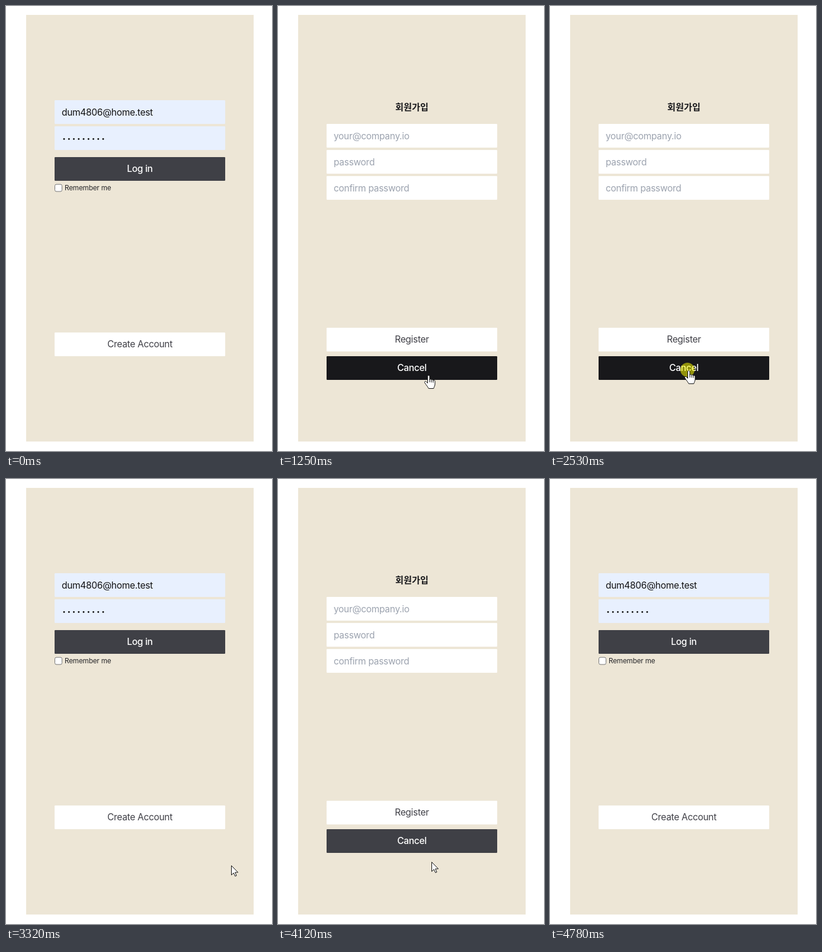
Recreate the animation shown at these times as an HTML page. Size 449x751 px, loop 5310 ms.

```html
<!DOCTYPE html>
<html lang="ko">
<head>
<meta charset="utf-8">
<title>Login and sign-up</title>
<style>
  html, body { margin: 0; width: 100%; height: 100%; overflow: hidden; background: #fff; }
  svg { display: block; width: 100vw; height: 100vh; }
  text { font: 400 15.5px Inter, "Noto Sans CJK KR", sans-serif; letter-spacing: -.3px; }
  .button text { text-anchor: middle; }
  .light rect { fill: #fff; }
  .light text { fill: #3f3f46; }
  .light.hover rect { fill: #cbd5e1; }
  .dark rect { fill: #3f4046; }
  .dark text { fill: #fff; font-weight: 500; }
  .dark.hover rect { fill: #18181b; }
  .field rect { fill: #fff; }
  .field text { fill: #9ca3af; }
  .filled rect { fill: #e8f0fe; }
  .filled text { fill: #111; }
  .title { font: 700 15.2px "Noto Sans CJK KR", "Noto Sans CJK", sans-serif; letter-spacing: 0; text-anchor: middle; fill: #18181b; }
  .small { font-size: 11.7px; letter-spacing: -.15px; fill: #27272a; }
  #pointer path { fill: #fff; stroke: #111; stroke-linejoin: round; }
</style>
</head>
<body>
<svg viewBox="0 0 449 751">
  <rect x="34" y="15" width="384" height="720" fill="#ede6d6"/>
  <g id="login">
    <g id="blank"></g>
    <g id="autofill"></g>
    <rect x="82.5" y="301" width="12" height="12" rx="2.5" fill="#fff" stroke="#767676"/>
    <text class="small" x="99" y="311">Remember me</text>
  </g>
  <g id="register">
    <text class="title" x="226" y="175.5">회원가입</text>
  </g>
  <circle id="click" r="12" fill="#ff0" fill-opacity=".53"/>
  <g id="pointer">
    <path id="arrow" d="M.5 .5V16.3L4.2 12.9L6.8 18.4L9.1 17.3L6.6 11.9H11.6Z"/>
    <g id="hand">
      <path d="M-1.5 2C-1.5 0 2 0 2 2V8C2 6.3 5 6.4 5 8.3C5 7 8 7.2 8 9.2C8 8 11 8.2 11 10.3V15C11 18 9.5 19.5 8.7 22.5H.2C-.8 20-3.7 17-6.4 12.6C-7.3 10.6-4.8 9.6-3.4 11.3L-1.5 13.4Z"/>
      <path d="M2 7.5V12M5 8.3V12.3M8 9.2V12.6"/>
    </g>
  </g>
</svg>
<script>
const LOOP = 5310, START = 190, TICK = 1000 / 15, EXIT = 69;
const byId = id => document.getElementById(id);

function make(parent, tag, attrs, text) {
  const node = document.createElementNS("http://www.w3.org/2000/svg", tag);
  for (const name in attrs) node.setAttribute(name, attrs[name]);
  if (text) node.textContent = text;
  return parent.appendChild(node);
}

function box(page, style, top, label, labelX, baseline) {
  const group = make(byId(page), "g", { class: style });
  make(group, "rect", { x: 82, y: top, width: 288, height: 40, rx: 1.2 });
  if (label) make(group, "text", { x: labelX, y: top + baseline }, label);
  return { group, top, page };
}
const field = (page, top, label, style = "") => box(page, "field " + style, top, label, 94, 26);
const button = (page, top, label, style) => box(page, "button " + style, top, label, 226, 25);

field("blank", 159, "your@company.io");
field("blank", 203, "password");
field("autofill", 159, "dum4806@home.test", "filled");
const secret = field("autofill", 203, "", "filled").group;
for (let i = 0; i < 9; i++) make(secret, "circle", { cx: 98 + 8.25 * i, cy: 224.5, r: 1.45, fill: "#111" });

["your@company.io", "password", "confirm password"]
  .forEach((label, row) => field("register", 199 + 44 * row, label));

const buttons = [
  button("login", 255, "Log in", "dark"),
  button("login", 551, "Create Account", "light"),
  button("register", 543, "Register", "light"),
  button("register", 591, "Cancel", "dark")
];

const linear = t => t;
const easeOut = t => 1 - (1 - t) ** 3;
const mix = (a, b, t) => a.map((v, i) => v + (b[i] - v) * t);

// Pointer moves, timed in ticks; "via" bends a move into a quadratic curve.
const enter = [416, 717];
const moves = [
  { start: 0, end: 7, via: [348, 566], to: [279, 566] },
  { start: 14, end: 22, to: [236, 664], ease: easeOut },
  { start: 23, end: 25, to: [229, 628] },
  { start: 27, end: 30, to: [234, 615] },
  { start: 36, end: 43, via: [240, 680], to: [350, 713] },
  { start: 43, end: 47, via: [509, 689], to: [380, 652] },
  { start: 47, end: 51, to: [295, 574] },
  { start: 53, end: 61, via: [262, 690], to: [253, 625] },
  { start: 62, end: 68, via: [300, 660], to: [437, 728] }
];
// Each click switches the page one tick later.
const clicks = [11, 35, 52, 61];

function pointerAt(tick) {
  let point = enter;
  for (const { start, end, via, to, ease = linear } of moves) {
    if (tick <= start) break;
    const t = ease(Math.min(1, (tick - start) / (end - start)));
    point = via ? mix(mix(point, via, t), mix(via, to, t), t) : mix(point, to, t);
  }
  return point.map(Math.round);
}

const show = (id, on) => { byId(id).style.display = on ? "" : "none"; };
const place = (id, x, y) => byId(id).setAttribute("transform", `translate(${x} ${y})`);

function draw(time) {
  const tick = Math.floor((time % LOOP - START) / TICK + .2);
  const page = clicks.filter(click => click < tick).length % 2 ? "register" : "login";
  const fresh = clicks.includes(tick - 1);
  const active = tick >= 0 && tick < EXIT;
  const [x, y] = pointerAt(tick);

  let over = false;
  for (const item of buttons) {
    const hit = active && item.page === page && x >= 82 && x < 370 && y >= item.top && y < item.top + 40;
    item.group.classList.toggle("hover", hit);
    over = over || hit;
  }
  show("login", page === "login");
  show("register", page === "register");
  show("blank", fresh);
  show("autofill", !fresh);
  show("pointer", active);
  show("hand", over);
  show("arrow", !over);
  show("click", clicks.includes(tick));
  place("pointer", x, y);
  place("click", x - 2, y - 1);
}

const origin = performance.now();
function frame() {
  draw(performance.now() - origin);
  requestAnimationFrame(frame);
}
frame();
</script>
</body>
</html>
```
